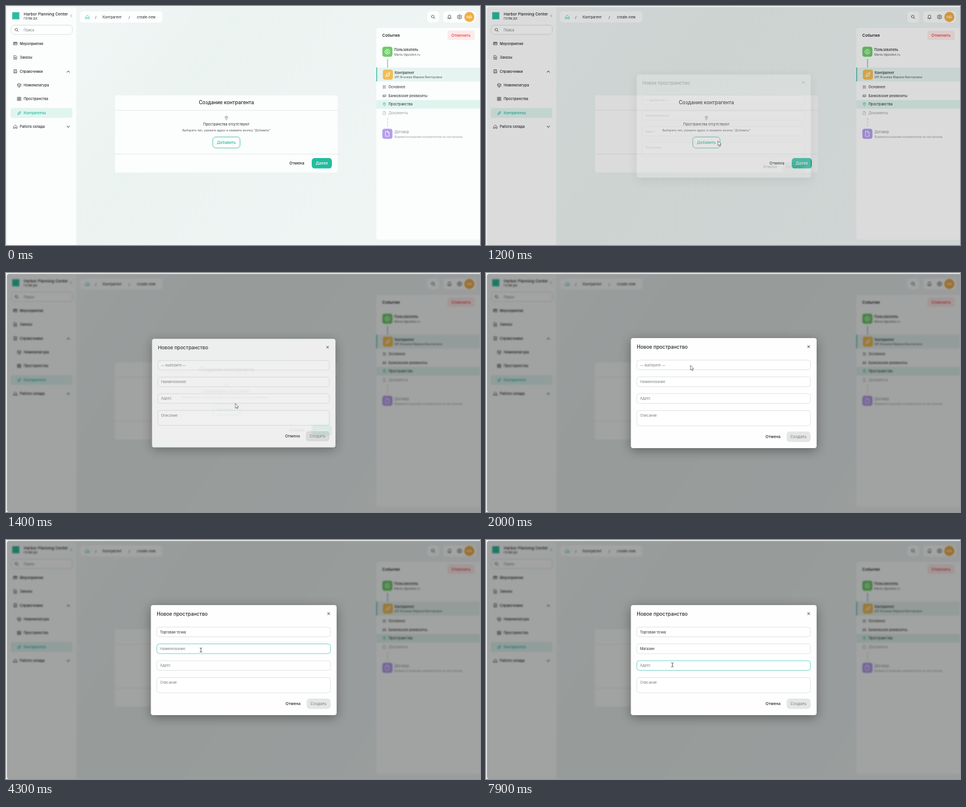
An HTML page that plays this animation: 800x404 px, repeating every 8 s.

```html
<!DOCTYPE html>
<html lang="ru">
<head>
<meta charset="utf-8">
<title>Новое пространство</title>
<style>
html, body { margin: 0; width: 100%; height: 100%; overflow: hidden; background: #f2f5f5; }
svg { display: block; width: 100%; height: 100%; font-family: Inter, sans-serif; }
text { white-space: pre; }
#dialog { transform-origin: 401.25px 203px; }
#card { filter: drop-shadow(0 4px 9px rgba(0, 0, 0, .36)); }
</style>
</head>
<body>
<svg id="stage" viewBox="0 0 800 404"></svg>
<script>
const INK = '#25282b', GREEN = '#20b698', MUTED = '#9a9d9f', LINE = '#d9dddd';

const PATHS = {
  home: 'M3 11L12 3l9 8v10h-6v-6H9v6H3z',
  events: 'M3 5h18v14H3zM3 10h18M8 5v5M15 5v5M7 14h4',
  file: 'M5 2h9l5 5v15H5zM13 2v6h6',
  order: 'M5 2h9l5 5v15H5zM12 10v7M8.5 13.5h7',
  book: 'M5 3h14v18H5zM5 16h14M9 7h6',
  box: 'M12 2l9 5v10l-9 5-9-5V7zM3 7l9 5 9-5M12 12v10',
  grid: 'M3 3h7v7H3zM14 3h7v7h-7zM3 14h7v7H3zM14 14h7v7h-7z',
  planet: 'M6 12a6 6 0 1 0 12 0a6 6 0 1 0-12 0M6 14C0 21 3 24 11 17S24 3 19 3q-2 0-5 3',
  pin: 'M12 22C7 16 4 13 4 9a8 8 0 0 1 16 0c0 4-3 7-8 13zM9 9a3 3 0 1 0 6 0a3 3 0 1 0-6 0',
  search: 'M3 10a7 7 0 1 0 14 0a7 7 0 1 0-14 0M15 15l6 6',
  bell: 'M4 18h16l-2-4V9A6 6 0 0 0 6 9v5zM10 21h4',
  gear: 'M10 2h4l1 3 3 1 3-1 1 4-2 3 2 3-1 4-3-1-3 1-1 3h-4l-1-3-3-1-3 1-1-4 2-3-2-3 1-4 3 1 3-1zM9 12a3 3 0 1 0 6 0a3 3 0 1 0-6 0',
  form: 'M4 4h5M15 4h5v5M20 15v5h-5M9 20H4v-5M4 9V4M8 12h8M8 16h5M8 8h8',
  card: 'M6 6h16v10H6zM6 10H2v9h16v-3M10 11h8',
  user: 'M2 12a10 10 0 1 0 20 0a10 10 0 1 0-20 0M8 10a4 4 0 1 0 8 0a4 4 0 1 0-8 0M5 19q7-8 14 0'
};

const text = (x, y, str, { size = 5.83, fill = INK, weight = 400, anchor = 'start', id = '' } = {}) =>
  `<text id="${id}" x="${x}" y="${y + size * .36}" font-size="${size}" fill="${fill}" font-weight="${weight}" text-anchor="${anchor}">${str}</text>`;
const rect = (x, y, w, h, fill, r = 0, stroke = 'none', id = '') =>
  `<rect id="${id}" x="${x}" y="${y}" width="${w}" height="${h}" rx="${r}" fill="${fill}" stroke="${stroke}" stroke-width=".8"/>`;
const line = (d, stroke = INK, width = .8, extra = '') =>
  `<path d="${d}" fill="none" stroke="${stroke}" stroke-width="${width}" stroke-linecap="round" stroke-linejoin="round" ${extra}/>`;
const icon = (name, x, y, stroke = INK, size = 7.5) =>
  `<g transform="translate(${x - size / 2} ${y - size / 2}) scale(${size / 24})">${line(PATHS[name], stroke, 2)}</g>`;
const badge = (name, x, y, fill) => rect(x - 8.5, y - 8.5, 17, 17, fill, 4) + icon(name, x, y, '#fff', 10);

function sidebar() {
  const rows = [
    ['events', 'Мероприятия', 63.5], ['order', 'Заказы', 87], ['book', 'Справочники', 110.5],
    ['box', 'Номенклатура', 134, 1], ['grid', 'Пространства', 157, 1],
    ['planet', 'Контрагенты', 181, 1, GREEN], ['home', 'Работа склада', 204]
  ];
  return rect(2, 2, 116.5, 402, '#fcfdfd') +
    rect(10.5, 10.5, 12, 12, '#2dbb9f') +
    text(30, 14, 'Harbor Planning Center', { size: 6.67, weight: 500 }) +
    text(30, 21.5, 'ГЕЛМ ДК', { size: 5 }) +
    line('M111 14.5l-2 2 2 2', GREEN) +
    rect(8.8, 32.4, 103, 15.6, '#fff', 4.5, '#d3d8d8') + icon('search', 18, 40.5) +
    text(30, 41, 'Поиск', { fill: '#74797c' }) +
    rect(8, 172.5, 104, 16.5, '#e0f5f0', 4) +
    rows.map(([name, label, y, sub, color = INK]) =>
      icon(name, sub ? 22.3 : 15.8, y, color) +
      text(sub ? 30 : 23.3, y, label, { fill: color, weight: 500 })).join('') +
    line('M103 112l2.2-2.2 2.2 2.2M103 203l2.2 2.2 2.2-2.2', INK, 1);
}

function header() {
  return rect(125, 9, 139, 19, '#fdfefe', 5) + icon('home', 137.3, 18.5, GREEN, 8) +
    text(150.5, 18.5, '/') + text(163, 18.5, 'Контрагент') +
    text(207, 18.5, '/') + text(221, 18.5, 'create-new') +
    rect(711, 9, 20, 19, '#fdfefe', 5) + icon('search', 721, 18.5, INK, 8) +
    rect(738, 9, 55, 19, '#fdfefe', 5) + icon('bell', 748.5, 18.5, INK, 8.5) + icon('gear', 765.5, 18.5, INK, 8.5) +
    '<circle cx="782" cy="18.5" r="8.5" fill="#f2ad45"/>' +
    text(782, 18.7, 'HA', { size: 6.67, fill: '#fff', weight: 500, anchor: 'middle' });
}

function eventsPanel() {
  const steps = [
    ['form', 'Основное', 137], ['card', 'Банковские реквизиты', 151.6],
    ['pin', 'Пространства', 166.2, GREEN], ['file', 'Документы', 181, MUTED]
  ];
  return rect(625, 37, 178, 358, '#fcfdfd', 4) +
    text(635, 49.5, 'События', { size: 6.67, weight: 600 }) +
    rect(745, 41.5, 46, 16, '#fdeaea', 4) +
    text(768, 49.5, 'Отменить', { size: 6.67, fill: '#e04a4a', weight: 500, anchor: 'middle' }) +
    badge('user', 643.7, 77.3, '#6ccc68') +
    text(655.3, 74.2, 'Пользователь', { weight: 500 }) +
    text(655.3, 82, 'Marta.V@zelkot.ru', { size: 5, fill: '#55595c' }) +
    line('M644 90v14', '#74c2bd', 1.3) +
    rect(625, 104, 175, 23.5, '#e6f4f1') + rect(625, 104, 1.3, 23.5, '#36b7a0') +
    badge('planet', 644.5, 116, '#f0bd56') +
    text(656, 112.8, 'Контрагент', { weight: 500 }) +
    text(656, 120.6, 'ИП Ясенева Марина Викторовна', { size: 5, fill: '#55595c' }) +
    rect(625, 159, 175, 14.5, '#dff4ee') +
    steps.map(([name, label, y, color = '#5b6063']) =>
      icon(name, 638.6, y, color, 6.5) +
      text(645.5, y, label, { fill: color === MUTED ? MUTED : INK })).join('') +
    line('M644 190v13', '#c9c8d4', 1, 'stroke-dasharray="2.5 2.5"') +
    badge('file', 643.7, 216, '#b49dec') +
    text(655.5, 213.2, 'Договор', { fill: '#85898c' }) +
    text(655.5, 221, 'Взаимоотношения контрагентов не настроены', { size: 5, fill: MUTED });
}

function createPanel() {
  const mid = { anchor: 'middle' };
  return rect(184, 151, 376, 130.5, '#fcfdfd', 3) +
    text(372, 163.3, 'Создание контрагента', { ...mid, size: 8.33, weight: 500 }) +
    line('M184 176.3H560M184 250.3H560', '#dfe3e3', .7) +
    icon('pin', 372, 189.3, '#6b7073', 7) +
    text(372, 200, 'Пространства отсутствуют', mid) +
    text(372, 209.8, 'Выберите тип, укажите адрес и нажмите кнопку "Добавить"', { ...mid, size: 5, fill: '#54585b' }) +
    rect(349, 221.4, 46, 18.6, '#fff', 5, GREEN) +
    text(372, 230.4, 'Добавить', { ...mid, size: 6.67, fill: GREEN, weight: 500 }) +
    text(491, 266, 'Отмена', { ...mid, size: 6.67, weight: 500 }) +
    rect(516, 257, 34, 17.6, '#22bd9f', 5) +
    text(533, 266, 'Далее', { ...mid, size: 6.67, fill: '#fff', weight: 500 });
}

function dialog() {
  const field = (y, h, label, id) =>
    rect(254.6, y, 293, h, '#fff', 4, LINE, id + 'Box') +
    text(260, y + 8.4, label, { fill: '#7b8083', id });
  return rect(244.5, 110, 313.5, 186, '#fefefe', 4, 'none', 'card') +
    text(254.6, 125, 'Новое пространство', { size: 8.33, weight: 500 }) +
    line('M542.9 122.8l3.3 3.3M546.2 122.8l-3.3 3.3', INK, 1) +
    field(147.2, 16.4, '— выберите —', 'type') +
    field(175.6, 16.4, 'Наименование', 'name') +
    field(204, 16.4, 'Адрес', 'address') +
    field(232.6, 25.6, 'Описание', 'note') +
    line('M260 209v7', INK, .5, 'id="caret"') +
    text(484.5, 276.7, 'Отмена', { size: 6.67, weight: 500, anchor: 'middle' }) +
    rect(507.5, 268, 40.3, 17.6, '#e4e5e5', 5) +
    text(527.5, 276.7, 'Создать', { size: 6.67, fill: '#85888a', weight: 500, anchor: 'middle' });
}

const $ = id => document.getElementById(id);
$('stage').innerHTML = `
  <defs>
    <linearGradient id="mint" x2="1" y2=".35">
      <stop stop-color="#f3f8f7"/><stop offset=".45" stop-color="#ebf3f1"/><stop offset="1" stop-color="#f0f5f4"/>
    </linearGradient>
    <clipPath id="window"><rect x="1.5" y="1.5" width="810" height="402.5" rx="4"/></clipPath>
  </defs>
  <g clip-path="url(#window)">
    <g id="page">${rect(0, 0, 800, 404, 'url(#mint)')}${sidebar()}${header()}${eventsPanel()}${createPanel()}</g>
    ${rect(0, 0, 800, 404, '#000', 0, 'none', 'shade')}
  </g>
  <g id="dialog">${dialog()}</g>
  <g id="cursor">
    <path id="arrow" d="M0 0v8l1.9-1.6 1.2 2.7 1.2-.5-1.2-2.7h2.5z" fill="#fff" stroke="#333" stroke-width=".6"/>
    ${line('M-1.6-3.5Q0-3.5 0-2.5Q0-3.5 1.6-3.5M0-2.5V2.5M-1.6 3.5Q0 3.5 0 2.5Q0 3.5 1.6 3.5', '#222', .7, 'id="beam"')}
  </g>`;

// time, x, y
const ROUTE = [
  [400, 470, 250], [950, 391.5, 228], [1250, 391.5, 228], [1400, 387, 220.5], [1900, 345, 156],
  [2300, 345, 156], [2600, 340, 172], [3100, 340, 172], [3600, 329, 186], [6500, 329, 186], [6900, 314.5, 211]
];
const KEYSTROKES = [4700, 4900, 5100, 5300, 5500, 5700, 6200];
const clamp = v => Math.max(0, Math.min(1, v));
const show = (id, on) => $(id).setAttribute('visibility', on ? 'visible' : 'hidden');

function setField(id, value, placeholder, focused) {
  $(id).textContent = value || placeholder;
  $(id).setAttribute('fill', value ? INK : '#7b8083');
  $(id + 'Box').setAttribute('stroke', focused ? '#55c9bb' : LINE);
}

function pointerAt(t) {
  const next = ROUTE.findIndex(p => p[0] > t);
  if (next < 1) return next ? ROUTE.at(-1).slice(1) : ROUTE[0].slice(1);
  const [t0, x0, y0] = ROUTE[next - 1], [t1, x1, y1] = ROUTE[next];
  const k = (t - t0) / (t1 - t0), e = k * k * (3 - 2 * k);
  return [x0 + (x1 - x0) * e, y0 + (y1 - y0) * e];
}

function draw(t) {
  const open = clamp((t - 1130) / 320);
  $('page').style.filter = open > .5 ? 'blur(.8px)' : 'none';
  $('shade').setAttribute('opacity', .36 * clamp(open * 1.7));
  $('dialog').style.opacity = open;
  $('dialog').style.transform = `scale(${.92 + .08 * open})`;

  const typed = KEYSTROKES.filter(k => k <= t).length;
  setField('type', t >= 2600 && 'Торговая точка', '— выберите —', false);
  setField('name', 'Магазин'.slice(0, typed), 'Наименование', t >= 4000 && t < 6900);
  setField('address', '', 'Адрес', t >= 6900);
  show('caret', t >= 7500 && t < 7900);

  const [x, y] = pointerAt(t);
  const beam = t > 3500 && !(y > 193 && y < 204);
  $('cursor').setAttribute('transform', `translate(${x} ${y})`);
  show('beam', beam);
  show('arrow', !beam && t >= 400);
}

// The screen is refreshed ten times a second.
function tick() {
  draw(Math.floor(performance.now() % 8000 / 100) * 100);
  requestAnimationFrame(tick);
}
tick();
</script>
</body>
</html>
```
